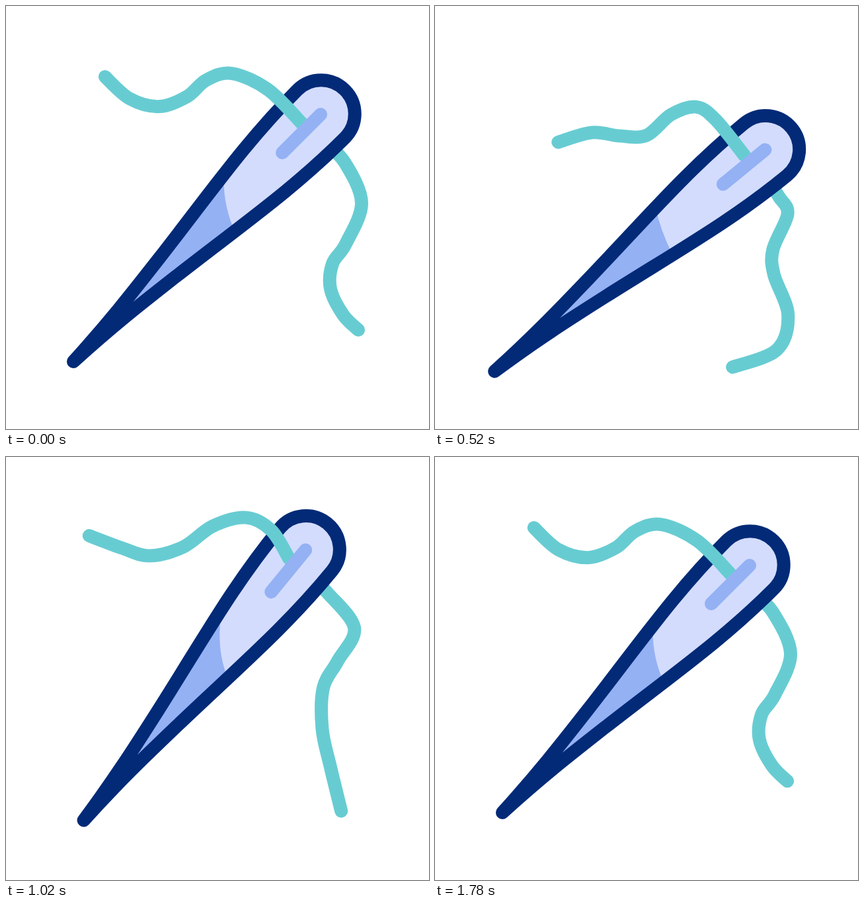
An HTML page that plays this animation: 640 by 640 pixels, repeating every 1800 ms.

```html
<!DOCTYPE html>
<html lang="en">
<head>
<meta charset="utf-8">
<title>Needle and thread</title>
<style>
html, body { margin: 0; width: 100%; height: 100%; overflow: hidden; background: #fff; }
svg { display: block; width: 100%; height: 100%; fill: none; stroke-width: 20; stroke-linecap: round; stroke-linejoin: round; }
.thread { stroke: #67ccd2; }
.fill { fill: #d3dcfd; }
.shade { fill: #94b1f4; }
.outline { stroke: #022a77; }
.slot { stroke: #94b1f4; }
</style>
</head>
<body>
<svg viewBox="0 0 640 640">
  <defs>
    <path id="body" d="M0 0C80-4 130-10 200-18.5C330-34.5 420-51 530-51A51 51 0 0 1 530 51C420 51 330 34.5 200 18.5C130 10 80 4 0 0Z"/>
  </defs>
  <path id="tail" class="thread"/>
  <g class="needle">
    <use href="#body" class="fill"/>
    <path id="shade" class="shade"/>
    <use href="#body" class="outline"/>
  </g>
  <path id="lead" class="thread"/>
  <g class="needle"><path class="slot" d="M529 0H447"/></g>
</svg>
<script>
const LOOP = 1800;
const HALF = 264.5; // needle tip to its turning centre

// Every part moves rest -> low -> high -> rest; handles shape each ease.
const moves = [
  { start: 0, end: 600, from: "rest", to: "low", handles: [0.4, 0.6] },
  { start: 600, end: 1110, from: "low", to: "high", handles: [0.43, 0.68] },
  { start: 1110, end: LOOP, from: "high", to: "rest", handles: [0.33, 0.4] }
];

const needle = {
  rest: { x: 289, y: 351, turn: 0 },
  low: { x: 295, y: 386.5, turn: 5.9 },
  high: { x: 284.4, y: 341, turn: -6.8 }
};

// Key points of each thread, from the needle outwards.
const lead = makeThread("lead", 90, {
  rest: "448,178 397,127 342,102 303,112 274,137 232,152 187,140 150,107",
  low: "469,228 426,174 398,155 360,167 322,199 282,198 240,194 193,219",
  high: "424,146 399,105 359,86 306,99 260,130 206,150 165,135 127,98"
});
const tail = makeThread("tail", 40, {
  rest: "480,204 512,236 538,298 514,360 494,390 491,428 510,467 533,490",
  low: "500,260 521,291 533,315 511,368 514,406 538,468 517,521 443,535",
  high: "462,178 482,196 528,253 502,303 476,342 470,403 489,458 528,514"
});

function ease(p, [a, b]) {
  let lo = 0, hi = 1;
  for (let i = 0; i < 20; i++) {
    const s = (lo + hi) / 2, r = 1 - s;
    if (3 * r * r * s * a + 3 * r * s * s * b + s * s * s < p) lo = s;
    else hi = s;
  }
  return lo * lo * (3 - 2 * lo);
}

function moment(time) {
  const t = (time + LOOP) % LOOP;
  const { start, end, from, to, handles } = moves.find(m => t < m.end);
  return { from, to, mix: ease((t - start) / (end - start), handles) };
}

const lerp = (a, b, mix) => a + (b - a) * mix;
const lerpAngle = (a, b, mix) => a + Math.atan2(Math.sin(b - a), Math.cos(b - a)) * mix;

// A thread is a chain of links, each with a heading and a length.
function makeThread(id, lag, poses) {
  const chains = {};
  for (const name in poses) {
    const points = poses[name].split(" ").map(pair => pair.split(",").map(Number));
    const links = points.slice(1).map(([x, y], i) => {
      const dx = x - points[i][0], dy = y - points[i][1];
      return { heading: Math.atan2(dy, dx), length: Math.hypot(dx, dy) };
    });
    chains[name] = { root: points[0], links };
  }
  return { path: document.getElementById(id), lag, chains };
}

// Links further from the needle follow later.
function threadPoints({ lag, chains }, t) {
  const now = moment(t);
  let [x, y] = chains[now.from].root.map((v, i) => lerp(v, chains[now.to].root[i], now.mix));
  const points = [[x, y]];
  const count = chains.rest.links.length;
  for (let i = 0; i < count; i++) {
    const { from, to, mix } = moment(t - lag * (i + 1) / count);
    const a = chains[from].links[i], b = chains[to].links[i];
    const heading = lerpAngle(a.heading, b.heading, mix);
    const length = lerp(a.length, b.length, mix);
    x += length * Math.cos(heading);
    y += length * Math.sin(heading);
    points.push([x, y]);
  }
  return points;
}

function smoothPath(points) {
  const at = i => points[Math.min(Math.max(i, 0), points.length - 1)];
  const handle = (i, sign) => at(i).map((v, k) => v + sign * (at(i + 1)[k] - at(i - 1)[k]) / 6);
  return points.slice(1).reduce((d, point, i) =>
    `${d}C${[...handle(i, 1), ...handle(i + 1, -1), ...point].map(v => v.toFixed(2)).join(" ")}`,
    `M${points[0].join(" ")}`);
}

const needleParts = document.querySelectorAll(".needle");
const shade = document.getElementById("shade");

function render(t) {
  const { from, to, mix } = moment(t);
  const [x, y, turn] = ["x", "y", "turn"].map(k => lerp(needle[from][k], needle[to][k], mix));
  for (const part of needleParts)
    part.setAttribute("transform", `translate(${x} ${y}) rotate(${turn - 45}) translate(${-HALF} 0)`);
  // The edge of the shade leans against the turn.
  shade.setAttribute("d",
    `M0 0L200-18.5L${362 - 2.7 * turn}-40Q${327 + 0.5 * turn}-8 ${311 + 1.5 * turn} 36L200 18.5Z`);
  for (const thread of [lead, tail])
    thread.path.setAttribute("d", smoothPath(threadPoints(thread, t)));
}

function tick() {
  render(performance.now() % LOOP);
  requestAnimationFrame(tick);
}
tick();
</script>
</body>
</html>
```
